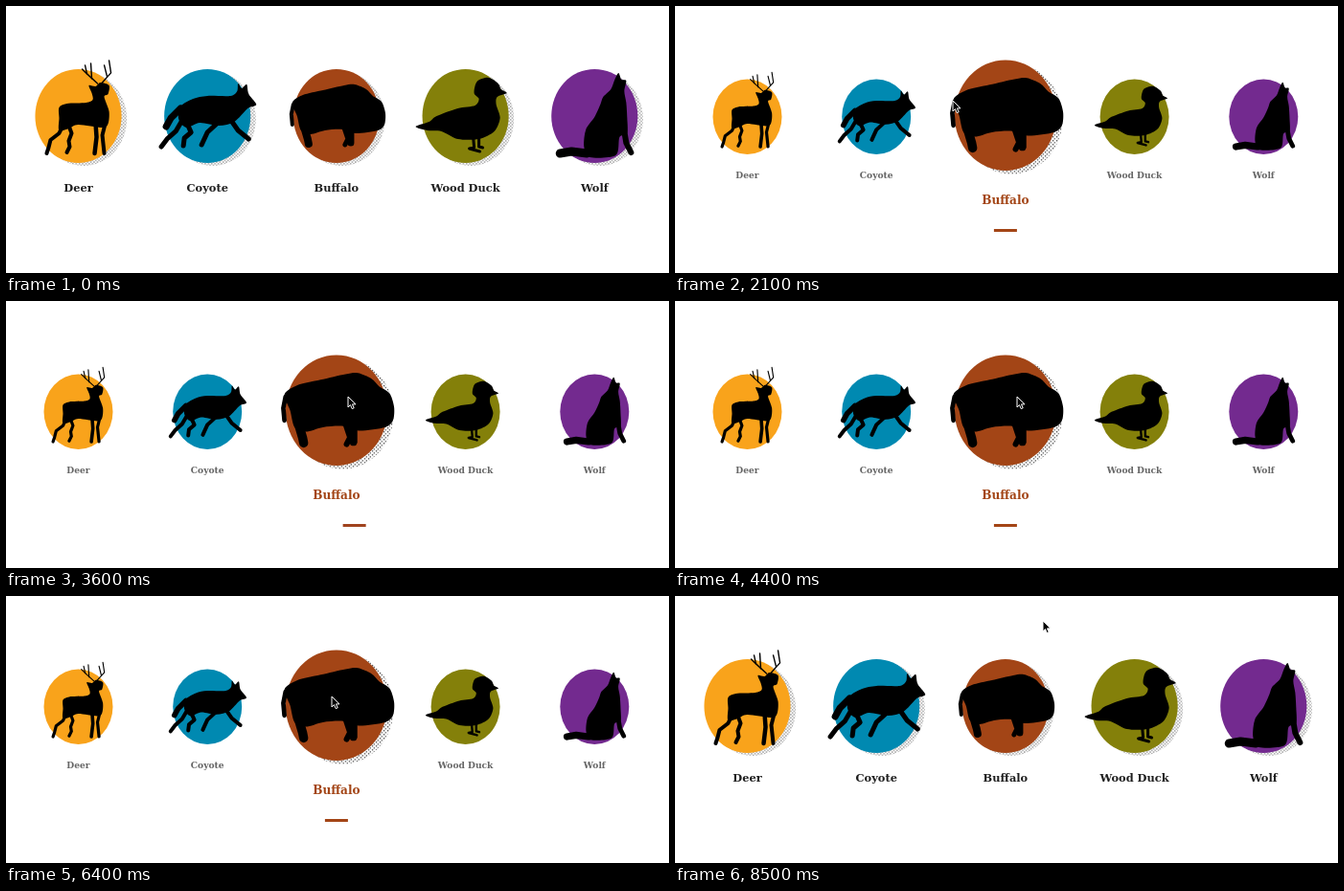
Animation of 692x279 px, one loop 8600 ms. Source, as an HTML page:

```html
<!DOCTYPE html>
<html lang="en">
<head>
<meta charset="utf-8">
<title>Animals</title>
<style>
  html, body { margin: 0; width: 100%; height: 100%; overflow: hidden; background: #fff; }
  svg { display: block; width: 692px; height: 279px; }
  text { font: bold 11.4px "DejaVu Serif", serif; text-anchor: middle; }
  .limb { fill: none; stroke: #000; stroke-linecap: round; stroke-linejoin: round; }
</style>
</head>
<body>
<svg viewBox="0 0 692 279">
  <defs>
    <pattern id="dots" width="3.4" height="3.4" patternUnits="userSpaceOnUse">
      <circle cx=".8" cy=".8" r=".6" fill="#333"/>
      <circle cx="2.5" cy="2.5" r=".6" fill="#333"/>
    </pattern>
  </defs>
  <g id="animals"></g>
  <rect id="bar" x="-12" y="233" width="24" height="3"/>
  <path id="cursor" d="M0 0V11L2.5 8.6 4.2 12.6 6.2 11.8 4.5 7.9H8Z"
        stroke="#fff" stroke-linejoin="round"/>
</svg>
<script>
const LOOP = 8600, STEP = 100, TRAVEL = 400;
const REST = 0.53; // growth between small (0) and active (1)
const FIRST_X = 75.5, SPACING = 134.7;
const DARK = [31, 31, 31], GREY = [102, 102, 102];

// Each figure is a smooth body outline plus limbs: [width, points], around its disc's centre.
const animals = [
  { name: "Deer", color: [249, 163, 27],
    body: "-20,-9 -12,-13 8,-14 15,-17 14,-24 11,-32 18,-31 23,-35 32,-32 31,-23 27,-20 32,-5 31,8 25,12 0,9 -10,13 -20,15 -20,2",
    limbs: [
      [4, "-17,12 -20,18 -29,25 -31,33 -33,39"], [4, "-10,10 -7,18 -10,26 -9,32 -12,38"],
      [4.5, "18,8 19,22 17,39"], [4, "28,8 25,20 27,39"],
      [1.4, "20,-34 9,-44 7,-53"], [1.4, "14,-39 13,-55"], [1.4, "9,-44 4,-49"],
      [1.4, "24,-34 34,-45 32,-58"], [1.4, "30,-41 27,-53"]] },
  { name: "Coyote", color: [0, 137, 177],
    body: "-28,-10 -15,-18 0,-21 24,-21 31,-26 32,-34 36,-29 41,-33 43,-23 51,-12 42,-8 28,6 12,10 -8,7 -22,12 -30,3",
    limbs: [
      [7, "-28,-8 -38,2 -43,11"], [5, "-26,4 -33,16 -42,24 -48,32"],
      [5, "-22,6 -17,17 -24,23 -25,31"], [5, "25,5 32,15 43,24"], [5, "12,6 0,17 -6,30"]] },
  { name: "Buffalo", color: [163, 69, 22],
    body: "-46,-14 -35,-22 -14,-27 8,-32 19,-33 31,-28 38,-21 47,-15 51,-3 50,9 43,15 20,18 6,14 -12,15 -27,19 -37,15 -41,0",
    limbs: [
      [4, "-45,-12 -47,-2 -46,9"], [8, "-33,14 -30,24 -29,29"],
      [7, "15,14 15,28"], [5, "8,12 12,24 9,30"]] },
  { name: "Wood Duck", color: [132, 128, 10],
    body: "-52,11 -38,6 -30,0 -8,-8 10,-11 14,-18 9,-24 12,-36 24,-40 34,-34 37,-28 43,-24 33,-20 32,-12 36,2 30,16 14,24 -8,24 -25,16 -40,15",
    limbs: [[3, "8,22 9,33 4,34 15,37"], [3, "14,22 14,32 18,33"]] },
  { name: "Wolf", color: [115, 42, 143],
    body: "25,-45 28,-38 33,-37 31,-26 33,-14 34,2 34,18 26,22 22,41 -5,43 -11,32 -9,14 0,1 6,-12 9,-20 17,-28 21,-38",
    limbs: [[9, "-8,39 -24,37 -36,39"], [6, "30,10 33,28 38,38"], [6, "20,20 20,38"]] },
];
animals.forEach((animal, i) => animal.x = FIRST_X + SPACING * i);

// Pointer stops: arrival time, hovered animal (-1 for none) and place.
const stops = [
  [200, -1, 340, 8], [500, 2, 290, 99], [2800, 4, 591, 129], [3200, 2, 357, 100],
  [4800, 4, 579, 127], [5800, 2, 340, 105], [7300, 1, 227, 110],
  [7700, -1, 275, 92], [8500, -1, 384, 26],
].map(([time, active, x, y]) => ({ time, active, x, y }));

const clamp = v => Math.min(1, Math.max(0, v));
const mix = (a, b, p) => a + (b - a) * p;
const rgb = channels => `rgb(${channels.map(Math.round)})`;

// cubic-bezier(.25, .1, .25, 1)
function ease(x) {
  if (x <= 0 || x >= 1) return clamp(x);
  const curve = (u, a, b) => 3 * (1 - u) ** 2 * u * a + 3 * (1 - u) * u * u * b + u ** 3;
  let low = 0, high = 1;
  for (let i = 0; i < 20; i++) {
    const mid = (low + high) / 2;
    if (curve(mid, .25, .25) < x) low = mid; else high = mid;
  }
  return curve(low, .1, 1);
}

// Value at time t that eases to a new target at every stop.
function follow(t, duration, target, start = target(-1)) {
  return stops.reduce((value, { time, active }, i) => {
    const end = Math.min(t, stops[i + 1]?.time ?? LOOP);
    return mix(value, target(active) ?? value, ease((end - time) / duration));
  }, start);
}

// Closed Catmull-Rom curve through the points.
function smoothPath(text) {
  const points = text.split(" ").map(pair => pair.split(",").map(Number));
  const at = i => points[(i + points.length) % points.length];
  const handle = (i, side) => at(i).map((v, axis) => v + side * (at(i + 1)[axis] - at(i - 1)[axis]) / 7);
  const curves = points.map((_, i) => `C${handle(i, 1)} ${handle(i + 1, -1)} ${at(i + 1)}`);
  return `M${points[0]}${curves.join("")}Z`;
}

function set(node, attributes) {
  for (const key in attributes) node.setAttribute(key, attributes[key]);
}

function add(parent, tag, attributes = {}) {
  const node = document.createElementNS("http://www.w3.org/2000/svg", tag);
  set(node, attributes);
  return parent.appendChild(node);
}

const layer = document.getElementById("animals");
const bar = document.getElementById("bar");
const cursor = document.getElementById("cursor");

for (const animal of animals) {
  const disc = { rx: 45, ry: 49 };
  animal.picture = add(layer, "g");
  animal.shadow = add(animal.picture, "ellipse", { ...disc, fill: "url(#dots)", transform: "translate(5.5 3)" });
  add(animal.picture, "ellipse", { ...disc, fill: rgb(animal.color) });
  add(animal.picture, "path", { d: smoothPath(animal.body) });
  for (const [width, points] of animal.limbs) {
    add(animal.picture, "polyline", { points, class: "limb", "stroke-width": width });
  }
  animal.label = add(layer, "text");
  animal.label.textContent = animal.name;
}

function drawAnimal(animal, index, t) {
  const value = (rest, small, active) => follow(t, 400, hovered =>
    hovered < 0 ? rest : hovered === index ? active : small);
  const growth = value(REST, 0, 1);

  set(animal.picture, {
    transform: `translate(${animal.x} ${115.8 - 1.6 * growth}) scale(${0.8 + 0.38 * growth})`,
  });
  set(animal.shadow, { opacity: clamp((growth - 0.4) / 0.12) });
  set(animal.label, {
    transform: `translate(${animal.x} ${179.7 + 27.2 * growth}) scale(${value(1, 0.8, 1.06)})`,
    fill: rgb(animal.color.map((c, i) => value(DARK[i], GREY[i], c))),
  });
}

function drawBar(t) {
  const slide = pick => follow(t, 600, active => animals[active] && pick(animals[active]), pick(animals[2]));
  set(bar, {
    transform: `translate(${slide(animal => animal.x)} 0)`,
    fill: rgb([0, 1, 2].map(i => slide(animal => animal.color[i]))),
    opacity: follow(t, 300, active => active < 0 ? 0 : 1),
  });
}

function drawCursor(t) {
  const next = stops.findIndex(stop => t <= stop.time);
  const to = stops[next], from = stops[Math.max(0, next - 1)];
  const p = ease(1 - (to.time - t) / TRAVEL);
  set(cursor, {
    visibility: next > 0 ? "visible" : "hidden",
    transform: `translate(${mix(from.x, to.x, p)} ${mix(from.y, to.y, p)})`,
  });
}

const startTime = performance.now();

function draw(now) {
  const elapsed = Math.max(0, now - startTime) % LOOP;
  const t = Math.floor(elapsed / STEP) * STEP;
  animals.forEach((animal, index) => drawAnimal(animal, index, t));
  drawBar(t);
  drawCursor(t);
  requestAnimationFrame(draw);
}
draw(startTime);
</script>
</body>
</html>
```
